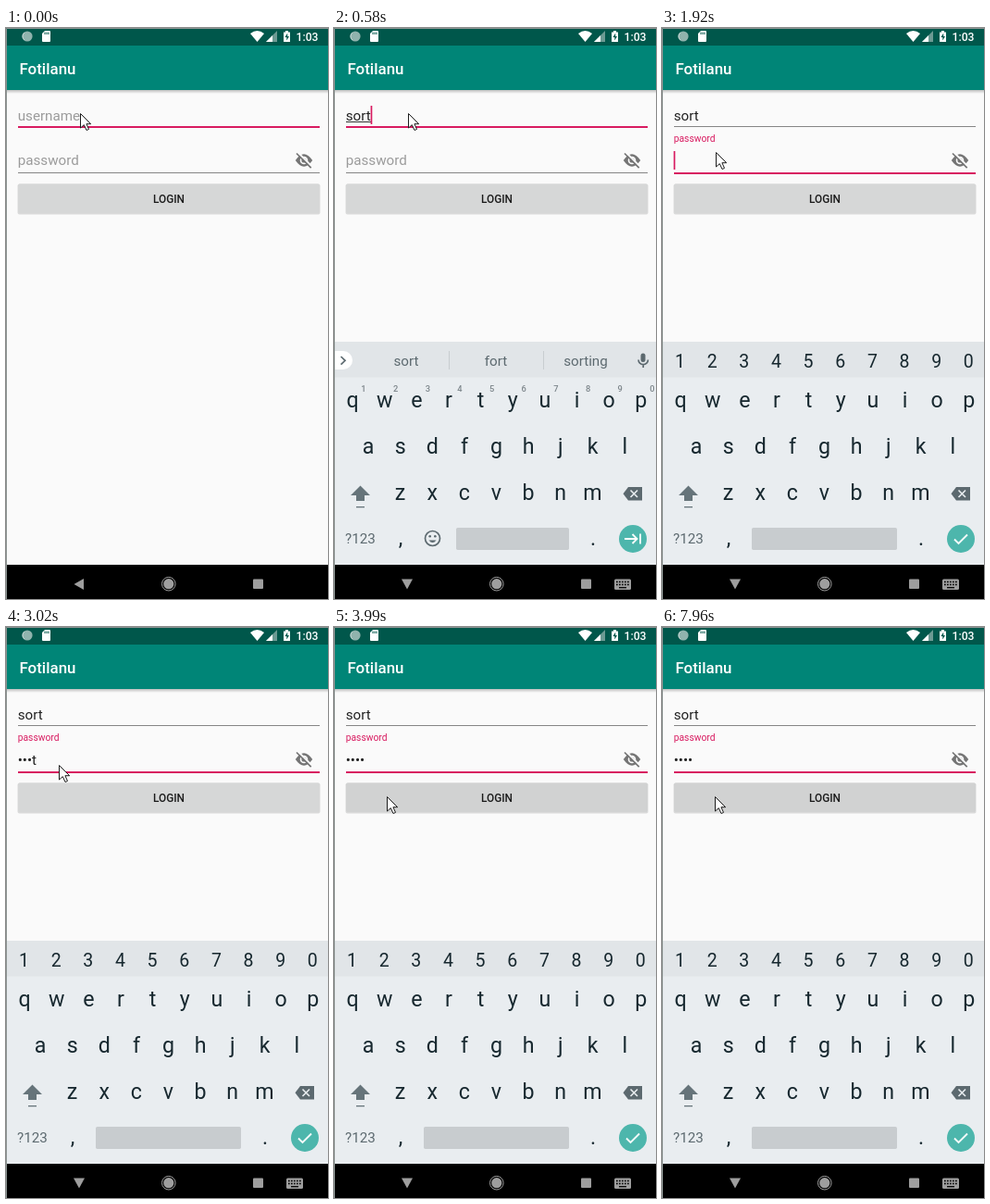
These frames come from a looping animation (348 px wide and 617 px high, 8 s). An HTML page:

```html
<!DOCTYPE html>
<html lang="en">
<head>
<meta charset="utf-8">
<title>Login form</title>
<style>
  html, body { margin: 0; width: 100%; height: 100%; overflow: hidden; background: #fafafa; }
  svg { display: block; width: 100vw; height: 100vh; font-family: Roboto, sans-serif; }
  .field { font-size: 15.2px; fill: #212121; }
  .hint { fill: #9b9b9b; }
  .mid { text-anchor: middle; }
  .key { font-size: 23.2px; fill: #17282f; }
  .digit { font-size: 19.5px; fill: #17282f; }
  .corner { font-size: 9.3px; font-weight: 500; fill: #7d868b; }
  .word { font-size: 15.2px; fill: #5c696f; }
  .icon { fill: none; stroke: #5c696f; stroke-width: 1.7; }
</style>
</head>
<body>
<svg viewBox="0 0 348 617" preserveAspectRatio="none">
  <defs>
    <linearGradient id="shade" x2="0" y2="1">
      <stop stop-color="#000" stop-opacity=".24"/>
      <stop offset="1" stop-color="#000" stop-opacity="0"/>
    </linearGradient>
  </defs>
  <rect width="348" height="617" fill="#fafafa"/>

  <!-- status and app bars -->
  <rect width="348" height="19" fill="#00574b"/>
  <rect y="19" width="348" height="48" fill="#008577"/>
  <rect y="67" width="348" height="4" fill="url(#shade)"/>
  <circle cx="23" cy="9" r="5.6" fill="#90b3ad"/>
  <path d="M20 13a5 5 0 0 1 0-8" fill="none" stroke="#c5d7d4"/>
  <path d="M42 3h5a1 1 0 0 1 1 1v10a1 1 0 0 1-1 1h-7a1 1 0 0 1-1-1V6z" fill="#fff"/>
  <path d="M42 4.500v2.500M44 4.500v2.500M46 4.500v2.500" stroke="#00574b"/>
  <path d="M264 6Q271.500 0 279 6L271.500 15z" fill="#fff"/>
  <path d="M281 15L293 3V15z" fill="#6c9a93"/>
  <path d="M281 15L288 8V15z" fill="#fff"/>
  <path d="M300 4.500h2V3h3v1.500h2V15h-7z" fill="#fff"/>
  <path d="M304.200 5.500L301.500 10h1.800v3.500L306 9h-1.800z" fill="#00574b"/>
  <text x="313.500" y="13.700" font-size="12.200" font-weight="500" fill="#fff">1:03</text>
  <text x="14.500" y="49.700" font-size="16.900" font-weight="500" fill="#fff">Fotilanu</text>

  <!-- form -->
  <text id="user" class="field" x="12.700" y="100.300"></text>
  <rect id="compose" x="13" y="101" height="1" fill="#333"/>
  <rect id="userLine" x="13" width="326"/>
  <text id="label" x="12.700">password</text>
  <text id="pass" class="field" x="12.700" y="149"></text>
  <rect id="passLine" x="13" width="326"/>
  <rect id="caret" width="1.700" height="20" fill="#d81b60"/>
  <path d="M312.800 143Q322 129.500 331.200 143Q322 156.500 312.800 143z" fill="#757575"/>
  <circle cx="322" cy="143" r="4.300" fill="#fafafa"/>
  <circle cx="322" cy="143" r="2.600" fill="#757575"/>
  <path d="M315.500 134.500L331 150" stroke="#fafafa" stroke-width="2"/>
  <path d="M314 135.500L329.700 151.200" stroke="#757575" stroke-width="1.700"/>
  <rect x="12.500" y="168.500" width="327" height="33" rx="2" fill="#000" opacity=".13"/>
  <rect id="button" x="13" y="168.500" width="326" height="31.500" rx="1.700"/>
  <text class="mid" x="176" y="189" font-size="11.850" font-weight="500" fill="#1b1b1b">LOGIN</text>

  <!-- keyboard -->
  <g id="keyboard">
    <rect y="339" width="348" height="242" fill="#e9edf0"/>
    <rect y="339" width="348" height="38.500" fill="#e1e5e8"/>
    <g id="keys"></g>
    <g id="words">
      <path d="M0 349H10a10 10 0 0 1 0 20H0z" fill="#fff"/>
      <path d="M7.500 355l4.500 4.300-4.500 4.300" class="icon" stroke-width="2"/>
      <path d="M124.500 349v20M226.500 349v20" stroke="#c8cdd0"/>
      <text class="word mid" x="78" y="364.700">sort</text>
      <text class="word mid" x="175" y="364.700">fort</text>
      <text class="word mid" x="272" y="364.700">sorting</text>
      <rect x="331.500" y="351.500" width="5" height="9.500" rx="2.500" fill="#5c696f"/>
      <path d="M329 358.500a5.200 5.200 0 0 0 10.400 0M334.200 364v3" class="icon" stroke-width="1.500"/>
      <circle cx="106.500" cy="551.500" r="8" class="icon"/>
      <path d="M102.500 553.500q4 5 8 0z" fill="#5c696f"/>
      <circle cx="103.700" cy="549.200" r="1.300" fill="#5c696f"/>
      <circle cx="109.300" cy="549.200" r="1.300" fill="#5c696f"/>
    </g>
    <path d="M28.500 494.500L39 505H33v6h-9v-6H18z" fill="#66747a"/>
    <rect x="24" y="517" width="9" height="1.300" fill="#66747a"/>
    <path d="M312.500 503.200L318 496h15v14.500H318z" fill="#5c696f"/>
    <path d="M320.500 499.500l7.500 7.500m0-7.500l-7.500 7.500" stroke="#e9edf0" stroke-width="1.600"/>
    <text class="word" x="12" y="557" font-size="14.800">?123</text>
    <text class="key mid" x="72" y="559">,</text>
    <text class="key mid" x="280" y="559">.</text>
    <rect id="space" y="540" height="24" rx="1.700" fill="#c8cccf"/>
    <circle cx="323" cy="552" r="15" fill="#4db6ac"/>
    <path id="action" fill="none" stroke="#fff" stroke-width="1.800"/>
  </g>

  <!-- navigation bar -->
  <rect y="580" width="348" height="37" fill="#000"/>
  <g fill="#9e9e9e">
    <path id="back"/>
    <circle cx="175.800" cy="600.700" r="5.600"/>
    <circle cx="175.800" cy="600.700" r="7.300" fill="none" stroke="#9e9e9e"/>
    <rect x="267" y="595.500" width="11" height="10.500" rx="1"/>
    <g id="switcher">
      <rect x="303" y="595.500" width="18" height="11.500" rx="1.500"/>
      <path d="M305 598.500h14M305 601.500h14" stroke="#000" stroke-width="1.500" stroke-dasharray="1.700 1.300"/>
      <path d="M308 604.700h8" stroke="#000" stroke-width="1.300"/>
    </g>
  </g>
  <path d="M.5 617V.5H348" fill="none" stroke="#8c9492"/>
  <path id="mouse" d="M.5 .5V16L4.300 12.600L7 18.500L9.500 17.400L6.900 11.700H11.700z" fill="#fff" stroke="#1c1c1c"/>
</svg>
<script>
const $ = id => document.getElementById(id);
const LOOP = 8000, PINK = "#d81b60";

// Each step keeps the earlier values and overrides some of them.
const steps = [
  [0, { user: "", pass: "", focus: "user", caret: false, float: 0, keys: "", nav: false, mouse: [80, 92], button: "#d6d7d7" }],
  [280, { nav: true }],
  [430, { user: "so", caret: true }],
  [580, { user: "sort", keys: "words" }],
  [1140, { caret: false, mouse: [78, 97] }],
  [1260, { mouse: [71, 108] }],
  [1380, { mouse: [63, 119] }],
  [1500, { mouse: [58, 134] }],
  [1650, { focus: "pass", caret: true, float: 0.15 }],
  [1770, { float: 0.75 }],
  [1920, { float: 1, keys: "digits" }],
  [2170, { pass: "s" }],
  [2310, { pass: "••r" }],
  [2430, { pass: "•••t" }],
  [3020, { caret: false, mouse: [57, 149] }],
  [3140, { mouse: [57, 157] }],
  [3290, { mouse: [57, 172] }],
  [3410, { mouse: [57, 183], caret: true }],
  [3560, { button: "#d4d5d5" }],
  [3690, { button: "#d1d2d2" }],
  [3990, { pass: "••••", caret: false }],
  ...[4420, 4950, 5500, 5880, 6440, 6960, 7370, 7960].map((t, i) => [t, { caret: i % 2 === 0 }])
];

const label = (cls, x, y, s) => `<text class="${cls}" x="${x}" y="${y}">${s}</text>`;
const row = (chars, x, y, cls = "key mid") =>
  [...chars].map((c, i) => label(cls, x + 34.65 * i, y, c)).join("");

$("keys").innerHTML = row("qwertyuiop", 20, 410) + row("asdfghjkl", 37, 460) + row("zxcvbnm", 71.5, 510) +
  `<g id="corners">${row("1234567890", 32, 393, "corner mid")}</g>` +
  `<g id="digits">${row("1234567890", 19.5, 366.5, "digit mid")}</g>`;

function set(id, attrs) {
  for (const name in attrs) $(id).setAttribute(name, attrs[name]);
}
const show = (id, on) => set(id, { display: on ? "inline" : "none" });
const mix = (a, b, k) => a + (b - a) * k;

function line(id, focused, y) {
  set(id, focused ? { y, height: 2, fill: PINK } : { y, height: 1, fill: "#858585" });
}

function draw(s) {
  const onUser = s.focus === "user", digits = s.keys === "digits";
  $("user").textContent = s.user || "username";
  set("user", { class: s.user ? "field" : "field hint" });
  $("pass").textContent = s.pass;
  const width = s[s.focus] ? $(s.focus).getComputedTextLength() : 0;

  show("compose", onUser && s.user);
  set("compose", { width: onUser ? width : 0 });
  show("caret", s.caret);
  set("caret", { x: 12.6 + width, y: onUser ? 84 : 133 });
  line("userLine", onUser, 106);
  line("passLine", !onUser, 156);
  set("label", {
    y: mix(148.3, 123.3, s.float),
    "font-size": mix(15.2, 10.3, s.float),
    fill: onUser ? "#9b9b9b" : PINK
  });
  set("button", { fill: s.button });

  show("keyboard", s.keys);
  show("words", !digits);
  show("corners", !digits);
  show("digits", digits);
  set("space", digits ? { x: 97, width: 157 } : { x: 132, width: 122 });
  set("action", { d: digits ? "M316 552.500l4.500 4.500 9.500-9.500" : "M314 552h13M322.500 547l5 5-5 5M331 546.500v11" });

  set("back", { d: s.nav ? "M73 595.500H85L79 606.500z" : "M84 595V607L73.500 601z" });
  show("switcher", s.nav);
  set("mouse", { transform: `translate(${s.mouse})` });
}

let last = -1;
function tick() {
  const t = performance.now() % LOOP;
  const passed = steps.filter(([start]) => start <= t);
  if (passed.length !== last) {
    last = passed.length;
    draw(Object.assign({}, ...passed.map(([, change]) => change)));
  }
  requestAnimationFrame(tick);
}
tick();
</script>
</body>
</html>
```
